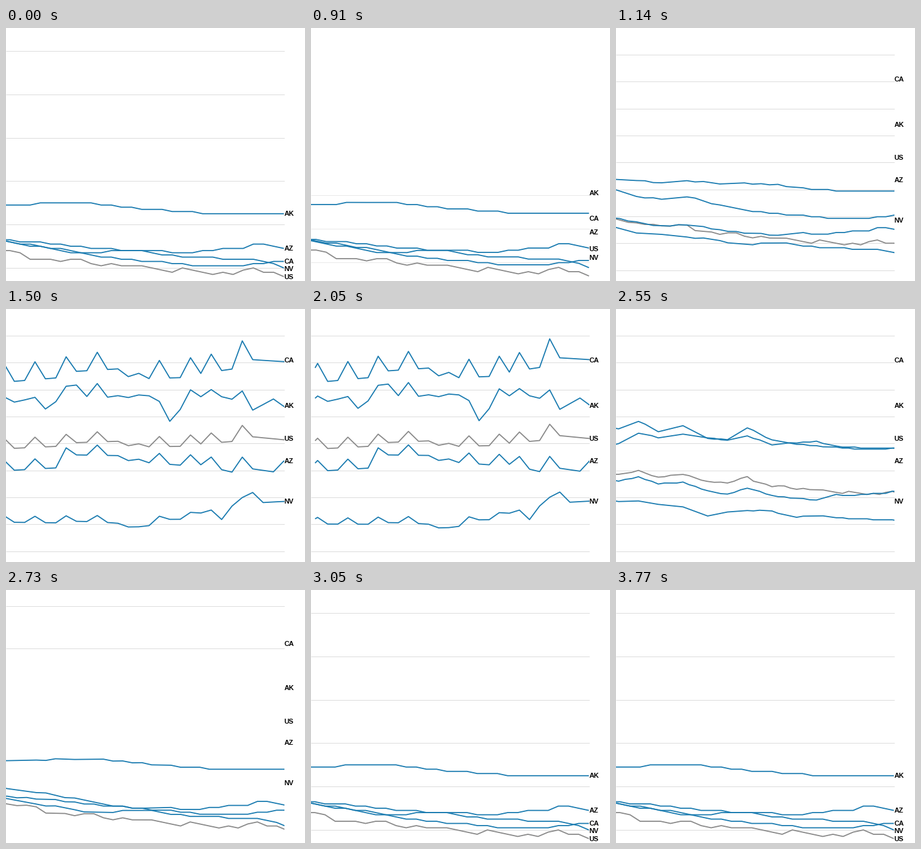
A matplotlib script for the animation above (3810 ms loop, 480 px wide and 407 px high).

```python
import numpy as np
import matplotlib.pyplot as plt
from matplotlib.animation import FuncAnimation
from matplotlib.collections import LineCollection
from matplotlib.patches import Rectangle

W, H, DPI = 480, 407, 100
PX = 72 / DPI
LOOP, FRAMES = 3810, 84
EDGE = 446
BLUE, GRAY = "#1a7bb0", "#8a8a8a"

MONTHS = np.arange(108)
YEARS = np.arange(-3, 29)
YEAR_KNOTS = np.round(11.5 + 3.5 * YEARS)  # month paired with each year
SCALE = 40.2  # ratio of the two vertical scales
TICKS_A = 37 + 69.75 * np.arange(6)
TICKS_B = 42.8 + 43.36 * np.arange(9)


def through(x, *points):
    """Straight segments through key points, flat beyond the ends."""
    return np.interp(x, *zip(*points))


def monthly(*points):
    """Height of a monthly rate, rounded to tenths, newest month first."""
    return 386 - 3.49 * np.round(through(MONTHS, *points))


def yearly():
    """Heights of the yearly curves; all follow the spikes of CA."""
    ca = through(YEARS, (0, 81.5), (3, 78.5), (4, 77), (5, 94), (8, 101.5),
                 (10, 108.5), (13, 110.5), (14, 102), (15, 107.5), (16, 95),
                 (20, 99.5), (22, 110.5), (26, 116.5))
    ca -= 29 * np.isin(YEARS, [4, 7, 9, 12, 18, 21, 24, 27])
    ak = 0.4 * ca + through(
        YEARS, (0, 122.5), (1, 111), (3, 130), (4, 111), (6, 101), (9, 98),
        (11, 136), (13, 94), (17, 102), (18, 91), (19, 100), (20, 81),
        (23, 115), (25, 99), (28, 108))
    az = 0.57 * ca + through(
        YEARS, (0, 197), (1, 215), (5, 208), (8, 192), (13, 184), (20, 178),
        (21, 180), (22, 193), (28, 194))
    nv = 0.35 * ca + through(
        YEARS, (0, 280.5), (2, 283), (3, 267), (4, 286), (5, 284), (6, 305),
        (8, 293), (9, 301), (11, 301), (14, 316), (18, 310), (28, 304))
    us = 0.57 * ca + through(YEARS, (0, 162), (4, 158))
    return {"US": us, "AK": ak, "AZ": az, "CA": ca, "NV": nv}


MONTHLY = {
    "US": monthly((0, -4), (1, -2), (2, -2), (3, 0), (4, -1), (5, -3), (6, -2),
                  (7, -3), (10, 0), (11, -2), (14, 1), (16, 1), (17, 2), (18, 1),
                  (20, 4), (22, 3), (23, 4), (25, 4), (26, 7), (107, 58)),
    "AK": monthly((8, 25.2), (14, 27.4), (19, 29.8), (24, 30), (25, 29), (107, 37)),
    "AZ": monthly((0, 9), (2, 11), (3, 11), (4, 9.4), (10, 6.9), (11, 7.4),
                  (17, 8.6), (27, 12.75), (107, 58)),
    "CA": monthly((0, 3.4), (4, 1.4), (9, 1.4), (14, 3.4), (18, 5.1), (22, 8.6),
                  (27, 11.8), (107, 85)),
    "NV": monthly((0, 0), (1, 2), (3, 3.7), (10, 5.3), (14, 7.6), (17, 7.6),
                  (18, 7.2), (21, 7.2), (27, 11.8), (107, 92)),
}
YEARLY = {name: np.interp(MONTHS, YEAR_KNOTS, y) for name, y in yearly().items()}
X_MONTHLY = 446 - 16.29 * MONTHS
X_YEARLY = 448 - 16.2 * through(MONTHS, (0, -3.3), *zip(YEAR_KNOTS, YEARS))

LABELS = {"US": (400, 208.2), "AK": (298, 155.2), "AZ": (354, 243.7),
          "CA": (375, 81.8), "NV": (387.3, 308.8)}


def mix(a, b, p):
    return a + (b - a) * p


def ease(t):
    t = min(max(t, 0), 1)
    return 4 * t ** 3 if t < 0.5 else 1 - 4 * (1 - t) ** 3


def progress(t):
    """Share of the yearly view reached by the curves and by the scale."""
    if t < 890:
        return 0, 0
    if t < 1875:
        return ease((t - 824) / 785), ease((t - 824) / 222)
    return ease((2919 - t) / 741), ease((2919 - t) / 230)


def grid_at(q):
    """Heights and opacity of the grid lines."""
    if q <= 0:
        return TICKS_A, 1
    if q >= 1:
        return TICKS_B, 1
    if q < 0.5:
        y = 346 + (TICKS_A - 346) * mix(1, 1 / SCALE, q)
        return y[y > 250], 1 - 1.6 * q
    y = 310 + (TICKS_B - 310) * mix(SCALE, 1, q)
    return y[(y > 0) & (y < 110)], max(0.1, 2 * q - 1)


fig = plt.figure(figsize=(W / DPI, H / DPI), dpi=DPI, facecolor="white")
ax = fig.add_axes([0, 0, 1, 1])
ax.set_xlim(0, W)
ax.set_ylim(H, 0)
ax.axis("off")

grid = LineCollection([], colors="#dcdcdc", linewidths=PX, zorder=1)
ax.add_collection(grid, autolim=False)

lines, labels = {}, {}
for name in MONTHLY:
    lines[name], = ax.plot([], [], color=GRAY if name == "US" else BLUE,
                           lw=1.8 * PX, solid_joinstyle="round",
                           solid_capstyle="butt", zorder=2)
    lines[name].set_clip_path(Rectangle((0, 0), EDGE + 0.5, H, transform=ax.transData))
    labels[name] = ax.text(446.7, 0, name, fontsize=11 * PX, weight="bold",
                           family="Liberation Sans", color="black",
                           va="baseline", zorder=3)


def draw(i):
    p, q = progress(i * LOOP / FRAMES + 3)
    heights, alpha = grid_at(q)
    grid.set_segments([[(0, y), (EDGE + 0.5, y)] for y in heights])
    grid.set_alpha(alpha)
    x = mix(X_MONTHLY, X_YEARLY, p)
    for name in MONTHLY:
        lines[name].set_data(x, mix(MONTHLY[name], YEARLY[name], p))
        labels[name].set_y(mix(*LABELS[name], q) + 4)
    return [grid, *lines.values(), *labels.values()]


anim = FuncAnimation(fig, draw, frames=FRAMES, interval=LOOP / FRAMES,
                     repeat=True, repeat_delay=0)
plt.show()
```
